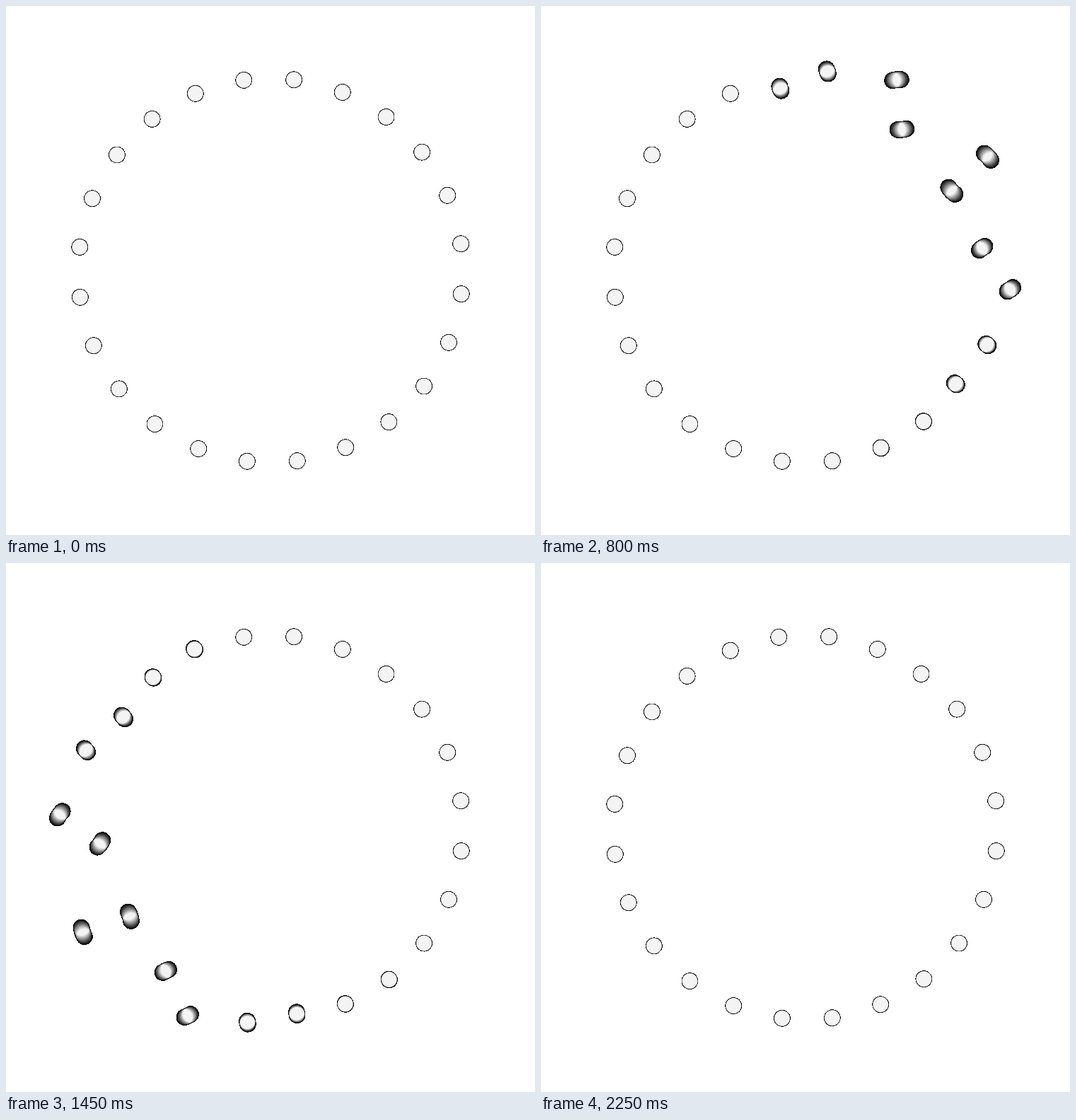
Recreate the animation shown at these times as an HTML page with a canvas. Size 748x748 px, loop 2.4 s.

```html
<!DOCTYPE html>
<html>
<head>
<meta charset="utf-8">
<title>Swapping dots</title>
<style>
html, body { margin: 0; width: 748px; height: 748px; overflow: hidden; background: #fff; }
canvas { display: block; }
</style>
</head>
<body>
<canvas id="stage" width="748" height="748"></canvas>
<script>
const SIZE = 748, LOOP = 2400, STEP = 50;
const PAIRS = 12, DELAY = 100, SWAP = 1200;
const RING = 271.8, TILT = -0.5, RADIUS = 11.5, RIM = 11.9;
const SHUTTER = 45, LAG = 26, SAMPLES = 24, FILL = 244;
const rad = deg => deg * Math.PI / 180;
const clamp = v => Math.min(1, Math.max(0, v));
const smooth = p => p * p * (3 - 2 * p);
const ease = p => smooth(smooth(smooth(clamp(p))));

const ctx = document.getElementById('stage').getContext('2d');
const image = ctx.createImageData(SIZE, SIZE);
const pixels = new Uint32Array(image.data.buffer);

// Each pair of neighbours turns half a circle about its midpoint.
function dotAt(pair, side, time) {
  const bearing = rad(TILT + 30 * pair);
  const mid = RING * Math.cos(rad(7.5));
  const half = side * RING * Math.sin(rad(7.5));
  const turn = (pair % 2 ? -1 : 1) * Math.PI * ease((time - DELAY * pair) / SWAP);
  return [
    SIZE / 2 + mid * Math.sin(bearing) + half * Math.cos(bearing + turn),
    SIZE / 2 - mid * Math.cos(bearing) + half * Math.sin(bearing + turn)
  ];
}

// Brightness is the share of the shutter time a pixel is covered.
function drawDot(pair, side, time) {
  const path = [];
  for (let i = 0; i < SAMPLES; i++) {
    const shift = ((i + 0.5) / SAMPLES - 0.5) * SHUTTER;
    path.push(dotAt(pair, side, time - LAG + shift));
  }
  const xs = path.map(p => p[0]), ys = path.map(p => p[1]);
  const left = Math.floor(Math.min(...xs) - RIM), right = Math.ceil(Math.max(...xs) + RIM);
  const top = Math.floor(Math.min(...ys) - RIM), bottom = Math.ceil(Math.max(...ys) + RIM);

  for (let y = top; y <= bottom; y++) {
    for (let x = left; x <= right; x++) {
      let cover = 0, hit = false;
      for (const [cx, cy] of path) {
        const d = Math.hypot(x + 0.5 - cx, y + 0.5 - cy);
        if (d < RIM) {
          hit = true;
          cover += clamp(RADIUS - d);
        }
      }
      if (hit) {
        const grey = Math.round(FILL * cover / SAMPLES);
        pixels[y * SIZE + x] = 0xff000000 + grey * 0x010101;
      }
    }
  }
}

let shown = -1;
function frame() {
  const time = Math.floor(performance.now() % LOOP / STEP) * STEP;
  if (time !== shown) {
    shown = time;
    pixels.fill(0xffffffff);
    for (let pair = 0; pair < PAIRS; pair++) {
      drawDot(pair, -1, time);
      drawDot(pair, 1, time);
    }
    ctx.putImageData(image, 0, 0);
  }
  requestAnimationFrame(frame);
}
frame();
</script>
</body>
</html>
```
